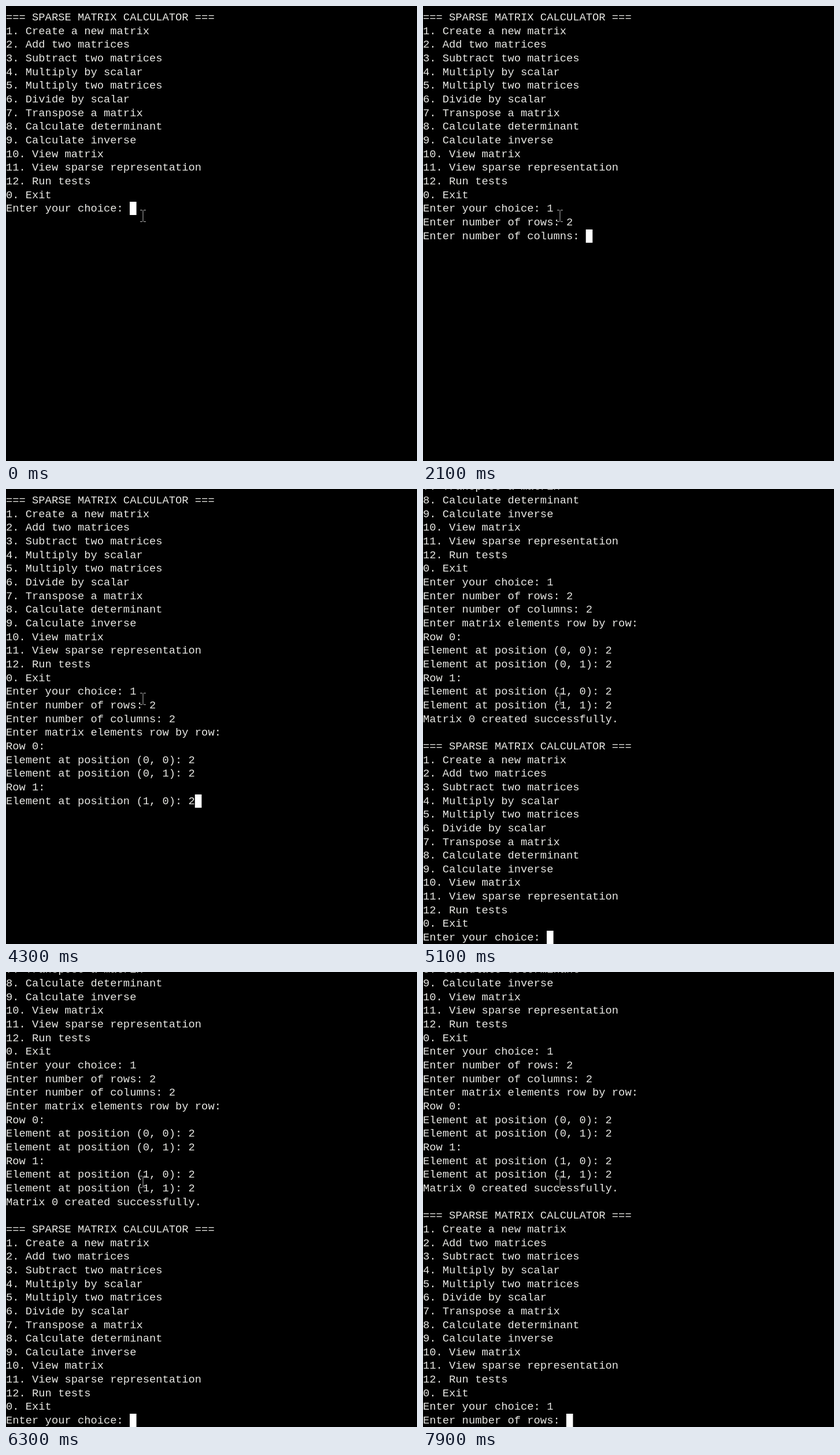
An HTML page with a canvas for the animation above (8 s loop, 711 by 788 pixels).

```html
<!DOCTYPE html>
<html lang="en">
<head>
<meta charset="utf-8">
<title>Sparse matrix calculator</title>
<style>
  html, body { margin: 0; width: 100%; height: 100%; overflow: hidden; background: #000; }
  canvas { display: block; }
</style>
</head>
<body>
<canvas id="screen" width="711" height="788"></canvas>
<script>
const LOOP = 8000, BLINK = 500;
const ROWS = 33, TOP = 7.4, ROW_H = 23.66, BASELINE = 17.6, CHAR_W = 11.28;
const ctx = document.getElementById('screen').getContext('2d');

const menu = `=== SPARSE MATRIX CALCULATOR ===
1. Create a new matrix
2. Add two matrices
3. Subtract two matrices
4. Multiply by scalar
5. Multiply two matrices
6. Divide by scalar
7. Transpose a matrix
8. Calculate determinant
9. Calculate inverse
10. View matrix
11. View sparse representation
12. Run tests
0. Exit
Enter your choice: `;
const rowsPrompt = '\nEnter number of rows: ';
const element = (r, c) => `\nElement at position (${r}, ${c}): `;

// [time, text added to the terminal]; each one restarts the cursor blink
const session = [
  [-200, menu],
  [500, '1'],
  [1100, rowsPrompt],
  [1800, '2'],
  [2100, '\nEnter number of columns: '],
  [2500, '2'],
  [2800, '\nEnter matrix elements row by row:\nRow 0:' + element(0, 0)],
  [3200, '2'],
  [3400, element(0, 1)],
  [3800, '2'],
  [4000, '\nRow 1:' + element(1, 0)],
  [4300, '2'],
  [4600, element(1, 1)],
  [4900, '2'],
  [5100, '\nMatrix 0 created successfully.\n\n' + menu],
  [7400, '1'],
  [7800, rowsPrompt]
];

// I-beam that inverts whatever is under it
function drawPointer() {
  ctx.globalCompositeOperation = 'difference';
  ctx.fillStyle = '#b4b4b4';
  for (const y of [353, 373]) {
    ctx.fillRect(232, y, 4, 1);
    ctx.fillRect(238, y, 4, 1);
  }
  ctx.fillRect(236.5, 354, 1, 19);
  ctx.globalCompositeOperation = 'source-over';
}

function draw(t) {
  const past = session.filter(([time]) => time <= t);
  const lines = past.map(([, text]) => text).join('').split('\n');
  const scroll = Math.max(0, lines.length - ROWS);
  const rowTop = i => TOP + (i - scroll) * ROW_H;

  ctx.fillStyle = '#000';
  ctx.fillRect(0, 0, 711, 788);
  ctx.fillStyle = '#e8e8e4';
  ctx.font = '18.8px "Courier New", "Liberation Mono", monospace';
  lines.forEach((line, i) => ctx.fillText(line, 0, Math.round(rowTop(i) + BASELINE)));

  const idle = t - past[past.length - 1][0];
  if (Math.floor(idle / BLINK) % 2 === 0) {
    const last = lines.length - 1;
    ctx.fillStyle = '#fff';
    ctx.fillRect(lines[last].length * CHAR_W - 0.3, Math.round(rowTop(last) + 0.6), 11.6, 23);
  }
  drawPointer();
}

const start = performance.now();
function tick() {
  draw((performance.now() - start) % LOOP);
  requestAnimationFrame(tick);
}
tick();
</script>
</body>
</html>
```
